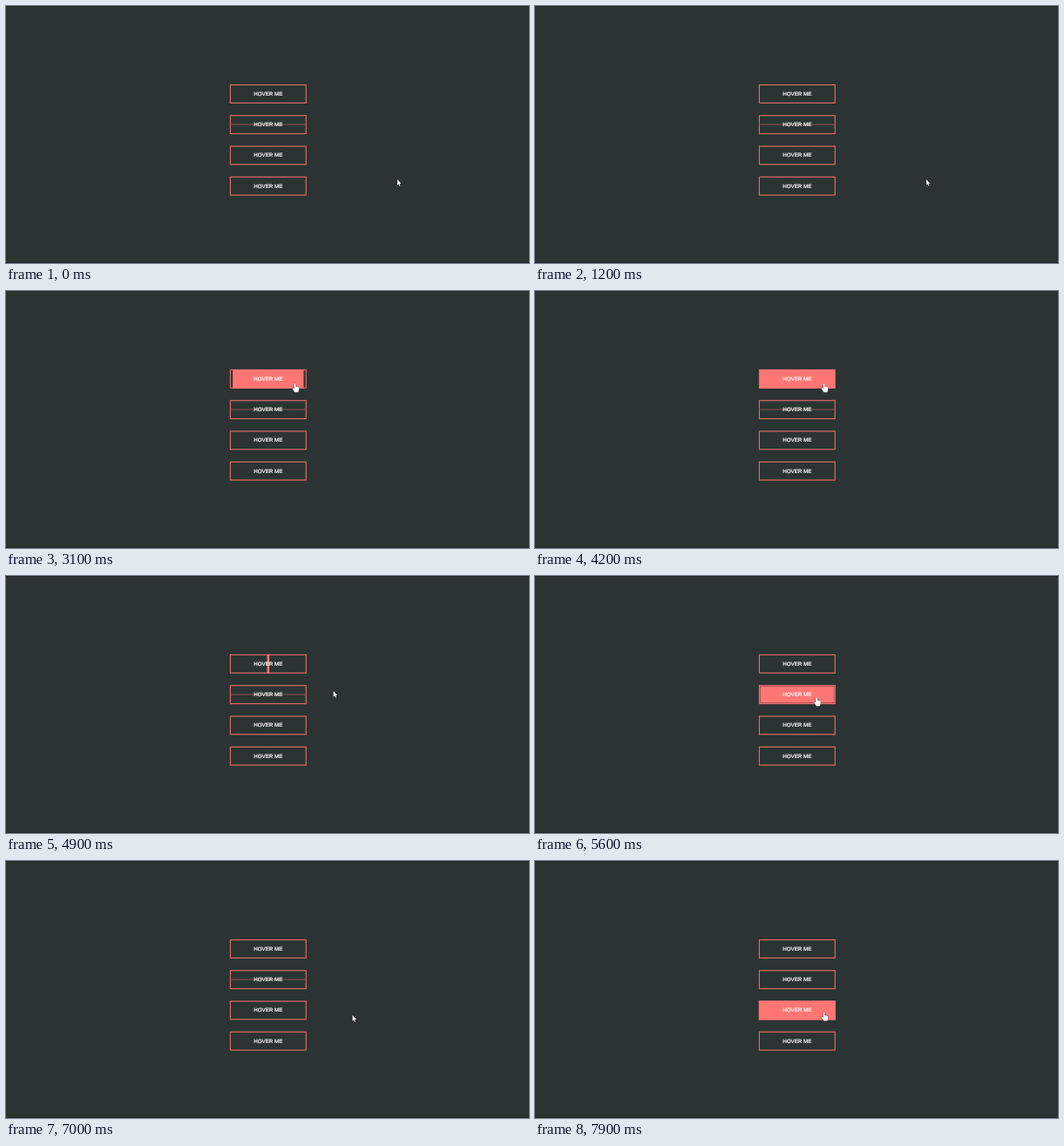
Write an HTML page with a canvas that moves like this. It is 600 px wide and 295 px high and loops after 8000 ms.

```html
<!DOCTYPE html>
<html lang="en">
<head>
<meta charset="utf-8">
<title>Hover buttons</title>
<style>
html, body { margin: 0; width: 100%; height: 100%; overflow: hidden; background: #2b3333; }
canvas { display: block; }
</style>
</head>
<body>
<canvas id="stage" width="600" height="295"></canvas>
<script>
const ctx = document.getElementById('stage').getContext('2d');
const LOOP = 8000, STEP = 100, FADE = 500;
const BACK = '#2b3333', EDGE = '#dc6b69', FILL = '#ff7675';
const X = 256.8, Y = 89.9, W = 88, H = 22, GAP = 35.25;

// Each trip bends through a control point and ends on the next button
const trips = [
  { start: 1850, end: 2900, from: [449, 199], bend: [387, 107], to: [331.5, 106] },
  { start: 4350, end: 5220, from: [331.5, 106], bend: [445, 130], to: [323, 139] },
  { start: 6300, end: 7250, from: [323, 139], bend: [565, 190], to: [331.5, 173.3] }
];

// The pointer enters a button shortly before a trip ends, leaves it shortly after the next starts
const hovers = trips.map((trip, i) => ({
  on: trip.end - 150,
  off: i + 1 < trips.length ? trips[i + 1].start + 160 : Infinity
}));

const clamp = v => Math.min(1, Math.max(0, v));
const smooth = p => p * p * (3 - 2 * p);

// CSS "ease": cubic-bezier(.25, .1, .25, 1)
function ease(p) {
  const bez = (s, a, b) => 3 * (1 - s) ** 2 * s * a + 3 * (1 - s) * s * s * b + s ** 3;
  let lo = 0, hi = 1;
  for (let i = 0; i < 20; i++) {
    const mid = (lo + hi) / 2;
    if (bez(mid, .25, .25) < p) lo = mid; else hi = mid;
  }
  return bez(lo, .1, 1);
}

function pointer(t) {
  const trip = trips.findLast(k => t >= k.start) ?? trips[0];
  const s = smooth(clamp((t - trip.start) / (trip.end - trip.start)));
  return trip.from.map((a, i) =>
    (1 - s) ** 2 * a + 2 * s * (1 - s) * trip.bend[i] + s * s * trip.to[i]);
}

function level(t, hover) {
  if (!hover) return 0;
  const fade = since => ease(clamp((t - since) / FADE));
  return t < hover.off ? fade(hover.on) : 1 - fade(hover.off);
}

function centred(w, h) {
  ctx.fillRect(-w / 2, -h / 2, w, h);
}

function outline(inset, width, colour) {
  ctx.lineWidth = width;
  ctx.strokeStyle = colour;
  ctx.strokeRect(inset - W / 2, inset - H / 2, W - 2 * inset, H - 2 * inset);
}

// Fill grows sideways, upright or along the diagonal
const fills = [
  p => centred((W - 1.6) * p, H),
  p => centred(W - 1, (H - 1) * p),
  p => { ctx.rotate(Math.PI / 4); centred(W, 80 * p); }
];

function label() {
  ctx.save();
  ctx.scale(.443, .443);
  ctx.font = '14px "Liberation Sans", Arial, sans-serif';
  ctx.textAlign = 'center';
  ctx.textRendering = 'geometricPrecision';
  ctx.fillStyle = ctx.strokeStyle = '#fff';
  ctx.lineWidth = .5;
  ctx.fillText('HOVER ME', 0, 4.6);
  ctx.strokeText('HOVER ME', 0, 4.6);
  ctx.restore();
}

function button(i, t) {
  const p = level(t, hovers[i]);
  ctx.save();
  ctx.translate(X + W / 2, Y + H / 2 + i * GAP);
  outline(.6, 1.2, EDGE);

  if (p > .003) {
    ctx.save();
    ctx.beginPath();
    ctx.rect(-W / 2, -H / 2, W, H);
    ctx.clip();
    ctx.fillStyle = FILL;
    fills[i](p);
    ctx.restore();
  }
  // The upright fill leaves a seam when full and a hairline when empty
  if (i === 1) {
    if (p > .9) {
      outline(1.6, .8, 'rgba(60,40,40,.5)');
    } else if (t < trips[2].end) {
      ctx.fillStyle = '#8f5252';
      ctx.fillRect(-W / 2, -.65, W, 1);
    }
  }
  label();
  ctx.restore();
}

const arrow = new Path2D('M0 0V6.6L1.5 5.3L2.4 7.6L3.4 7.2L2.5 5H4.4Z');
const hand = new Path2D('M-.9 .8Q0-.6 .9 .8V3.6L4.4 4.6Q5 5 4.8 6.6L3.9 10.3H-.2L-2.7 6.6Q-3 5.3-1.9 5.5L-.9 6.4Z');

function cursor(t) {
  const over = hovers.some(h => t >= h.on && t < h.off);
  const shape = over ? hand : arrow;
  ctx.save();
  ctx.translate(...pointer(t));
  ctx.lineWidth = .8;
  ctx.lineJoin = 'round';
  ctx.strokeStyle = over ? '#3a2c2e' : '#1c2222';
  ctx.stroke(shape);
  ctx.fillStyle = '#fff';
  ctx.fill(shape);
  ctx.restore();
}

function draw(time) {
  const t = Math.floor(time % LOOP / STEP) * STEP;
  ctx.fillStyle = BACK;
  ctx.fillRect(0, 0, 600, 295);
  ctx.fillStyle = '#22282a';
  ctx.fillRect(0, 0, 600, 1);
  ctx.fillRect(0, 294, 600, 1);
  for (let i = 0; i < 4; i++) button(i, t);
  cursor(t);
}

let start;
function tick(now) {
  start ??= now;
  draw(now - start);
  requestAnimationFrame(tick);
}
draw(0);
requestAnimationFrame(tick);
</script>
</body>
</html>
```
